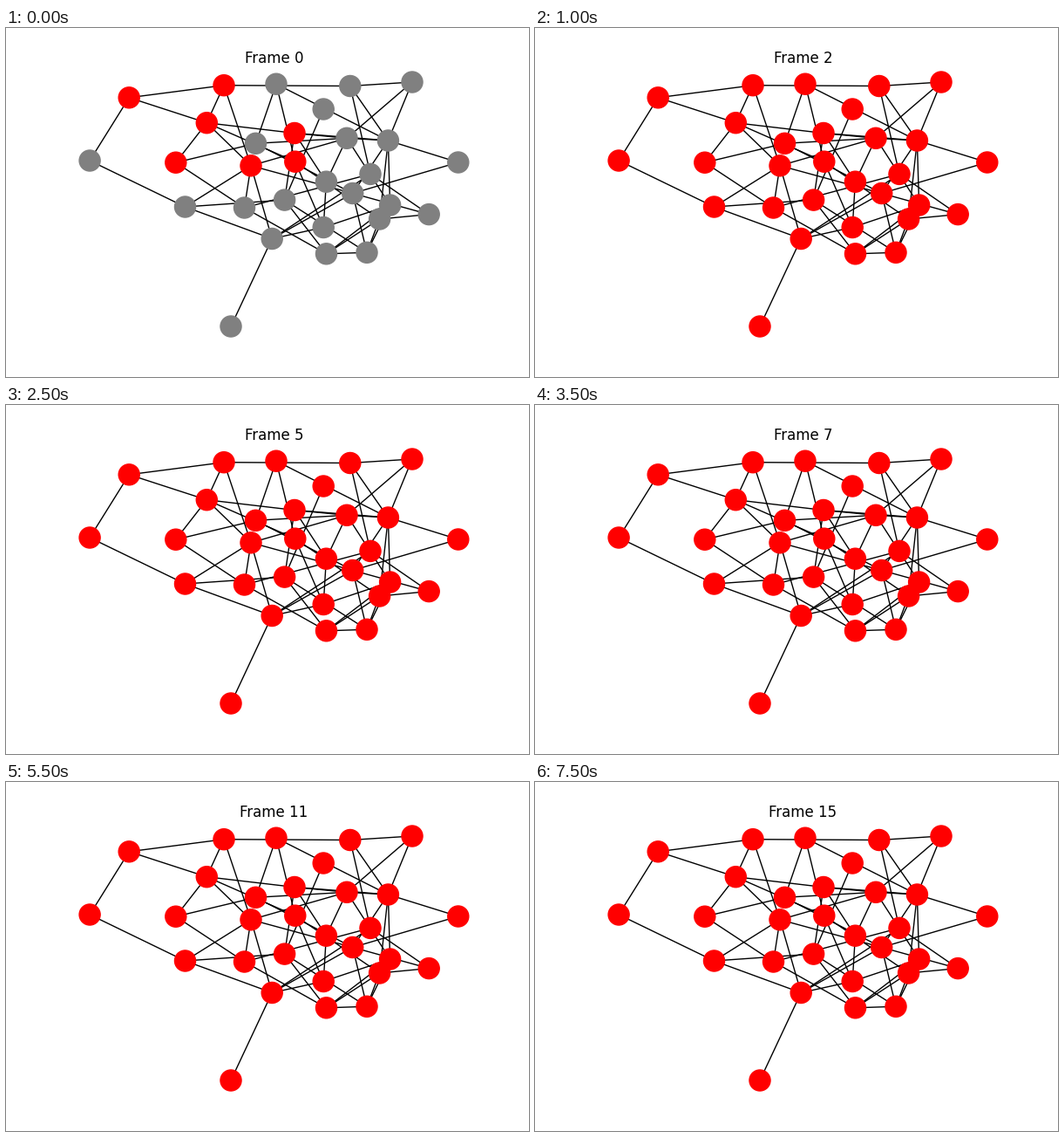
These frames come from a looping animation (600 px wide and 400 px high, 8000 ms). A matplotlib script:

```python
import matplotlib.pyplot as plt
from matplotlib.animation import FuncAnimation
from matplotlib.collections import LineCollection

# Node positions in stage pixels, y pointing down
NODES = {
    "A": (96.1, 152), "B": (141.2, 79.8), "C": (250, 65.7), "D": (230.3, 108.7),
    "E": (194.8, 154.2), "F": (205.5, 205), "G": (310, 64.2), "H": (394.8, 66.5),
    "I": (466, 62), "J": (364.2, 93), "K": (331, 120.5), "L": (286.5, 132.3),
    "M": (281, 157.8), "N": (331.8, 153.2), "O": (391, 126.3), "P": (438.4, 129),
    "Q": (518.8, 154), "R": (418, 167.4), "S": (367.4, 176.2), "T": (397.7, 189.5),
    "U": (319.6, 197.1), "V": (273.5, 206), "W": (305.2, 241.5), "X": (364.2, 228.5),
    "Y": (367.5, 258.8), "Z": (414, 257.3), "b": (440.6, 203), "a": (428.6, 219),
    "c": (485.2, 213.6), "d": (258, 342),
}
EDGES = """AB AF BC BD CD CH CM DE DK DM DN EL EV FM FU FW GL GN GP HI HP HR
IO IP JU KO KP KS KU LO LT MO MT MV MW NX Na OP OS Ob PQ PT Pa Pb QT Rc
SX TZ Tc UY UZ VR VY WR WT WX Wd Xb YZ Ya Yb Za Zb ac""".split()
START = "D"
FRAMES, INTERVAL = 16, 500


def distances(start):
    """Number of hops from the start node to every other node."""
    dist = {start: 0}
    queue = [start]
    for node in queue:
        for edge in EDGES:
            if node in edge:
                other = edge.replace(node, "")
                if other not in dist:
                    dist[other] = dist[node] + 1
                    queue.append(other)
    return dist


dist = distances(START)

fig, ax = plt.subplots(figsize=(6, 4), dpi=100)
ax.set_xlim(75, 540)
ax.set_ylim(356, 48)
ax.axis("off")
title = ax.set_title("Frame 0", fontsize=12)

lines = [[NODES[p], NODES[q]] for p, q in EDGES]
ax.add_collection(LineCollection(lines, colors="black", linewidths=1, zorder=1),
                  autolim=False)
xs, ys = zip(*NODES.values())
dots = ax.scatter(xs, ys, s=300, linewidths=1, zorder=2, clip_on=False)


def update(frame):
    colors = ["red" if dist[n] <= frame + 1 else "gray" for n in NODES]
    dots.set_facecolor(colors)
    dots.set_edgecolor(colors)
    title.set_text(f"Frame {frame}")
    return dots, title


anim = FuncAnimation(fig, update, frames=FRAMES, interval=INTERVAL,
                     repeat=True, repeat_delay=0)
plt.show()
```
